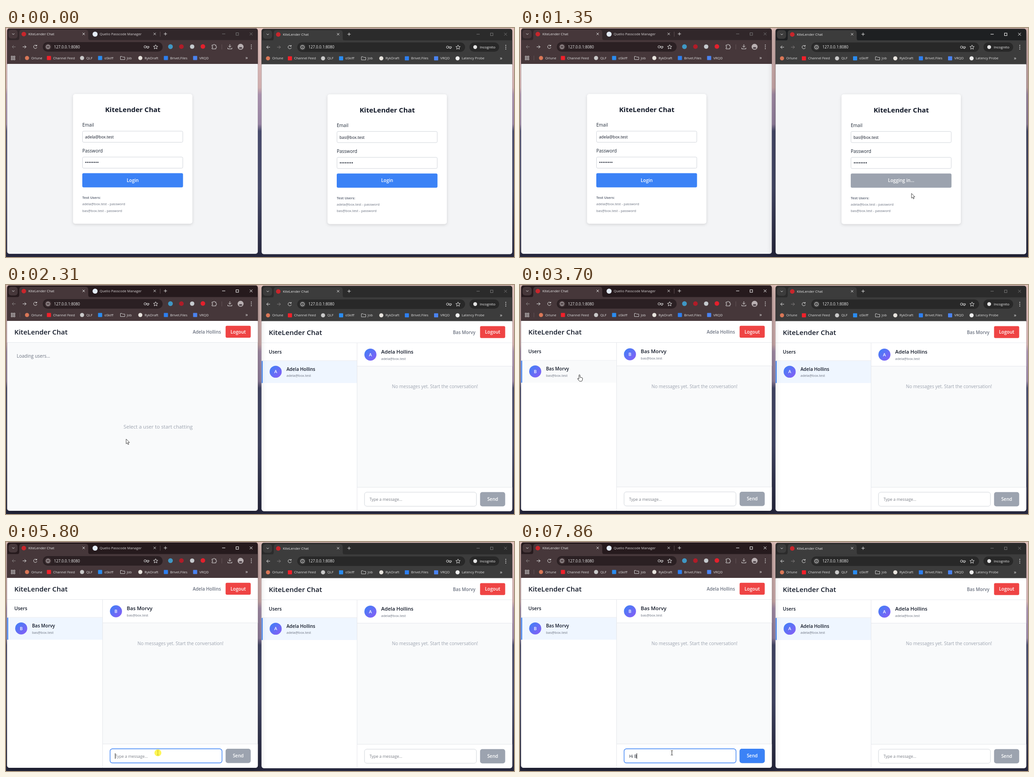
An HTML page for the animation above (8000 ms loop, 1112 px wide and 504 px high).

```html
<!DOCTYPE html>
<html lang="en">
<head>
<meta charset="utf-8">
<title>Two-window chat</title>
<style>
  html, body { margin: 0; width: 100%; height: 100%; overflow: hidden; background: #25263c; }
  svg { display: block; width: 1112px; height: 504px; font-family: "Open Sans", "Noto Sans", sans-serif; }
  text { white-space: pre; }
  .card { filter: drop-shadow(0 2px 3px rgba(0, 0, 0, .13)); }
  .raised { filter: drop-shadow(0 3px 9px rgba(0, 0, 0, .36)); }
</style>
</head>
<body>
<svg viewBox="0 0 1112 504">
  <defs>
    <linearGradient id="sky" x2="0" y2="1">
      <stop offset="0" stop-color="#e0c0ba"/><stop offset=".26" stop-color="#cfadae"/>
      <stop offset=".29" stop-color="#a890ac"/><stop offset=".42" stop-color="#9683a2"/>
      <stop offset=".45" stop-color="#474a6c"/><stop offset=".7" stop-color="#454969"/>
      <stop offset="1" stop-color="#25263c"/>
    </linearGradient>
    <linearGradient id="face" x2="1" y2="1">
      <stop offset="0" stop-color="#3b82f6"/><stop offset="1" stop-color="#8b5cf6"/>
    </linearGradient>
    <clipPath id="frame"><rect x="2.5" y="1" width="548.7" height="496" rx="5"/></clipPath>
  </defs>
  <rect width="1112" height="504" fill="url(#sky)"/>
  <g id="windows"></g>
  <g id="pointer"></g>
</svg>
<script>
const LOOP = 8000;
const APP = 'KiteLender Chat';
const ADELA = { name: 'Adela Hollins', mail: 'adela@box.test' };
const BAS = { name: 'Bas Morvy', mail: 'bas@box.test' };
const INK = '#111827', GREY = '#6b7280', PALE = '#9ca3af', BLUE = '#3b82f6', LINE = '#e5e7eb';

// Login click, signed in, users listed, chat opened
const LEFT = { me: ADELA, peer: BAS, steps: [2060, 2240, 2390, 3640], dx: 0, dy: 0,
  bar: '#46373a', field: '#2b2023', on: '#261a1d', off: '#31272a' };
const RIGHT = { me: BAS, peer: ADELA, steps: [900, 1440, 1520, 1700], dx: 557, dy: .7, incognito: true,
  bar: '#3c3c3c', field: '#282828', on: '#1e2022', off: '#2b2b2b' };

const CLICKS = [900, 1700, 2040, 3600, 4400, 5800];
const KEYS = [6880, 7110, 7300, 7860];
const CARETS = [0, 6.5, 8.7, 11, 16.6];

// time, x, y, shape from then on
const PATH = [
  [70, 1106, 490, 'arrow'], [740, 840, 338, 'hand'], [950, 840, 338, 'arrow'],
  [1350, 857, 364, 'arrow'], [1650, 680, 196, 'hand'], [1760, 675, 196, 'arrow'],
  [2020, 263, 336, 'hand'], [2240, 263, 339, 'arrow'], [2440, 263, 339, 'arrow'],
  [2880, 660, 486, 'arrow'], [3290, 150, 198, 'hand'], [3600, 130, 198, 'hand'],
  [3780, 130, 198, 'arrow'], [4120, 628, 300, 'arrow'], [4420, 678, 194, 'hand'],
  [4870, 678, 194, 'hand'], [5600, 332.5, 464, 'beam']
];

const rect = (x, y, w, h, fill, r = 0, more = '') =>
  `<rect x="${x}" y="${y}" width="${w}" height="${h}" rx="${r}" fill="${fill}" ${more}/>`;
const dot = (x, y, r, fill) => `<circle cx="${x}" cy="${y}" r="${r}" fill="${fill}"/>`;
const line = (d, color, width = 1, fill = 'none') =>
  `<path d="${d}" stroke="${color}" stroke-width="${width}" fill="${fill}" stroke-linejoin="round"/>`;
const text = (x, y, size, str, fill, weight = 400, anchor = 'start') =>
  `<text x="${x}" y="${y}" font-size="${size}" fill="${fill}" font-weight="${weight}" text-anchor="${anchor}">${str}</text>`;
const field = (x, y, w, h, r, color = '#d1d5db', width = 1) =>
  rect(x, y, w, h, '#fff', r, `stroke="${color}" stroke-width="${width}"`);
const button = (x, y, w, h, fill, label, r = 3) =>
  rect(x, y, w, h, fill, r) + text(x + w / 2, y + h / 2 + 3.6, 10, label, '#fff', 600, 'middle');
const avatar = (x, y, user) =>
  dot(x, y, 13.2, 'url(#face)') + text(x, y + 3.4, 9.5, user.name[0], '#fff', 600, 'middle');

const BOOKMARKS = [
  [46, 'Orlune', '#d97757'], [94, 'Channel Feed', '#f0202a', 1], [166.5, 'QLF', '#c9c9c9'],
  [206, 'oSkiff', '#2a8cf0', 1], [255, 'Job'], [294, 'RykDraft', '#e8e4de'],
  [350, 'Brivet.Files', '#2d7ff0', 1], [414, 'VRQD', '#4a83f0', 1], [461, 'Latency Probe', '#eeeeee']
];

function bookmark([x, label, color, square]) {
  const icon = !color ? line(`M${x - 4.5} 62.500h3.500l1.500 1.500h4.500v5.500h-9.500z`, '#ccc')
    : square ? rect(x - 4.5, 61.5, 9, 9, color, 1) : dot(x, 66, 4.5, color);
  return icon + text(x + 9.2, 68.6, 7.5, label, '#dedede');
}

function chrome(win, active) {
  const { incognito } = win;
  const white = '#e3e3e3', dim = '#858080', caption = active ? '#fff' : '#777';
  const end = incognito ? 448 : 343;
  let s = rect(2, 1, 550, 80, active ? win.on : win.off)
    + rect(5.5, 4, 20, 19, win.bar, 6) + line('M13.500 12l2.500 2.500l2.500 -2.500', white)
    + `<path d="M24 27q5 0 5-5v-12q0-6 6-6h139q6 0 6 6v12q0 5 5 5z" fill="${win.bar}"/>`
    + dot(39, 13.5, 5, '#c8262c') + text(49, 16.2, 7.6, APP, '#e8e8e8')
    + line('M167.500 10.500l5 5m0-5l-5 5', white);
  if (!incognito) {
    s += dot(195, 13.5, 5.5, '#e4ecf8') + text(205, 16.2, 7.6, 'Quelio Passcode Manager', '#d8d4d5')
      + line('M323 10.500l5 5m0-5l-5 5', white) + line('M337.500 8v11', '#6a5a5d', .8);
  }
  const plus = incognito ? 194 : 349;
  s += line(`M${plus - 3.500} 13h7m-3.500-3.500v7`, white)
    + line('M473 13h7', caption) + rect(503.5, 10.5, 5.5, 5.5, 'none', 0, `stroke="${caption}"`)
    + line('M533.500 10l6 6m0-6l-6 6', caption)
    + rect(2, 26.5, 550, 54, win.bar)
    + line('M21 41.500h-7.500m3.500-3.500l-3.500 3.500l3.500 3.500', incognito ? white : dim)
    + line('M36.500 41.500h7.500m-3.500-3.500l3.500 3.500l-3.500 3.500', incognito ? dim : white)
    + line('M67 39a3.700 3.700 0 1 0 .700 3.500m-.300-5.500v2.500h-2.800', white)
    + rect(80.5, 31, end - 80.5, 21, win.field, 10.5)
    + dot(92, 41.5, 7, win.bar)
    + line('M88 41.500a4 4 0 1 0 8 0a4 4 0 1 0-8 0M92 41v2.600m0-4.600v1', white)
    + text(105, 44.7, 8.4, '127.0.0.1:8080', '#eeeeee');
  const key = end - 36, star = end - 15.5;
  s += line(`M${key - 5} 41.500a2.500 2.500 0 1 0 5 0a2.500 2.500 0 1 0-5 0m5-1h6v2.500h-1.500v1.500h-2v-1.500h-2.500`, white)
    + line(`M${star} 36.800l1.400 3.200l3.400.300l-2.600 2.300l.800 3.400l-3-1.800l-3 1.800l.800-3.400l-2.600-2.300l3.400-.300z`, white);
  if (incognito) {
    s += rect(457.5, 31, 65, 20.5, win.field, 10) + dot(470, 41.3, 4.2, '#e3e3e3')
      + text(480, 44.2, 7.9, 'Incognito', '#eeeeee');
  } else {
    s += dot(360, 41, 5.2, '#3f97c4') + dot(384, 41, 5, '#b01c28') + dot(407.5, 41, 4.8, '#c5cace')
      + dot(431, 40.8, 5, '#e3202c')
      + line('M451 37.500h3a1.500 1.500 0 0 1 3 0h2.500v3a1.500 1.500 0 0 1 0 3v2.500h-8.500v-2.500a1.500 1.500 0 0 0 0-3z', white)
      + line('M472.500 36v11', '#6a5a5d', .8)
      + line('M490 36v6.500m-3-3l3 3l3-3m-7.500 4v2.500h9v-2.500', white)
      + dot(513.5, 41.3, 6.5, '#b9b0b2') + rect(510, 42, 7, 4, '#55494f', 2);
  }
  for (const y of [37.5, 41.5, 45.5]) s += dot(537, y, 1, white);
  if (!incognito) {
    for (const x of [11.5, 16.5]) for (const y of [62, 67])
      s += rect(x, y, 3, 3, 'none', 0, `stroke="${white}" stroke-width=".9"`);
    s += line('M30.500 61v10', '#6a5a5d', .8);
  }
  s += `<g transform="translate(${incognito ? -29.5 : 0})">`
    + BOOKMARKS.slice(0, incognito ? 9 : 8).map(bookmark).join('') + '</g>';
  return s + text(524, 69, 11, '»', white);
}

function loginPage(win, busy, hover) {
  const fill = busy ? PALE : hover ? '#2563eb' : BLUE;
  return rect(2, 79, 550, 419, '#f3f4f6')
    + rect(146.8, 145.2, 261.2, 285.6, '#fff', 5, 'class="card"')
    + text(277.5, 185, 15, APP, INK, 700, 'middle')
    + text(167, 217, 10, 'Email', '#1f2937', 500) + field(167.5, 227, 219.5, 24.5, 2.5)
    + text(173, 243, 8.75, win.me.mail, INK)
    + text(167, 274, 10, 'Password', '#1f2937', 500) + field(167.5, 284, 219.5, 24.5, 2.5)
    + text(173, 300, 10, '••••••••', INK)
    + button(167, 319.5, 220.5, 31.3, fill, busy ? 'Logging in...' : 'Login')
    + text(167, 376, 7.5, 'Test Users:', GREY, 700)
    + text(167, 390, 7.5, ADELA.mail + ' - password', GREY)
    + text(167, 404.5, 7.5, BAS.mail + ' - password', GREY);
}

function composer(win, t) {
  const focused = win === LEFT && t >= 5800;
  const typed = focused ? KEYS.filter(k => t >= k).length : 0;
  const ready = focused ? Math.min(1, Math.max(0, (t - KEYS[0]) / 200)) : 0;
  let s = rect(212, 445, 340, 53, '#fff') + rect(212, 444, 340, 1, LINE)
    + (focused ? field(227.8, 455.3, 245, 31, 5, BLUE, 1.4) : field(227.8, 455.3, 245, 31, 5))
    + (typed ? text(239, 474.5, 8.75, 'Hi B'.slice(0, typed), INK)
      : text(238.7, 474.5, 8.75, 'Type a message...', '#7b7f87'))
    + rect(480.7, 455, 55, 31.5, PALE, 5)
    + `<g opacity="${ready.toFixed(2)}">${rect(480.7, 455, 55, 31.5, BLUE, 5)}</g>`
    + text(508.3, 474.3, 10, 'Send', '#fff', 600, 'middle');
  if (focused && (t < 6340 || typed)) s += rect(238.6 + CARETS[typed], 465, 1, 12, '#111');
  return s;
}

function chatPage(win, step, t, hover) {
  const { me, peer } = win;
  let s = rect(2, 79, 550, 419, '#f9fafb') + rect(2, 79, 550, 47, '#fff') + rect(2, 126, 550, 1, LINE)
    + text(18.3, 109, 15, APP, INK, 600) + text(470.5, 107, 9.8, me.name, GREY, 600, 'end')
    + button(480.7, 89.8, 55, 26.2, '#ef4444', 'Logout');
  if (step === 2) {
    return s + text(23.5, 160, 10, 'Loading users...', GREY)
      + text(333, 316, 11.2, 'Select a user to start chatting', PALE, 400, 'middle');
  }
  const open = step === 4;
  const settled = open && t > win.steps[3] + 150;
  s += rect(2, 127, 209, 371, '#fff') + rect(211, 127, 1, 371, LINE)
    + text(18.3, 150, 10.4, 'Users', INK, 600) + rect(2, 165.5, 209, 1, LINE)
    + rect(2, 166.5, 209, 48.5, settled ? '#eff6ff' : open || hover ? '#f9fafb' : '#fff')
    + (open ? rect(2, 166.5, 2.8, 48.5, BLUE) : '')
    + avatar(33.3, 190.2, peer) + text(57, 188.3, 10, peer.name, INK, 600)
    + text(57, 201.6, 7.5, peer.mail, GREY);
  if (!open) return s + text(381, 316, 11.2, 'Select a user to start chatting', PALE, 400, 'middle');
  return s + rect(212, 127, 340, 51, '#fff') + rect(212, 177.5, 340, 1, LINE)
    + avatar(240.7, 152.5, peer) + text(264.3, 150.3, 11.2, peer.name, INK, 600)
    + text(264.3, 164.3, 7.5, peer.mail, GREY)
    + text(382, 226.8, 9.95, 'No messages yet. Start the conversation!', PALE, 400, 'middle')
    + composer(win, t);
}

function drawWindow(win, active, t, mouse) {
  const step = win.steps.filter(s => t >= s).length;
  const inside = (x, y, w, h) => mouse && mouse.x - win.dx > x && mouse.x - win.dx < x + w
    && mouse.y > y && mouse.y < y + h;
  const page = step < 2 ? loginPage(win, step === 1, inside(167, 320, 220, 31))
    : chatPage(win, step, t, inside(2, 166, 209, 49));
  return `<g transform="translate(${win.dx} ${win.dy})">`
    + rect(2.5, 1, 548.7, 496, win.bar, 5, active ? 'class="raised"' : '')
    + `<g clip-path="url(#frame)">${chrome(win, active)}${page}</g></g>`;
}

function mouseAt(t) {
  if (t < PATH[0][0]) return null;
  const i = PATH.findLastIndex(p => t >= p[0]);
  const [t0, x, y, shape] = PATH[i];
  const [t1, x1, y1] = PATH[i + 1] || [LOOP, x, y];
  const u = (t - t0) / (t1 - t0), k = u * u * (3 - 2 * u);
  return { x: x + (x1 - x) * k, y: y + (y1 - y) * k, shape };
}

const SHAPES = {
  arrow: line('M0 0v10.500l2.400-2.200l1.700 3.900l1.700-.800l-1.700-3.700h3.300z', '#333', .9, '#fff'),
  hand: line('M-1 1q0-1.500 1.200-1.500t1.200 1.500v4l3.600.700q2 .400 2 2.300l-.800 4q-.400 2-2.500 2h-2.200q-1.300 0-2.200-1.200l-3.500-4.600q.800-1.500 3.200.700z', '#222', .9, '#fff'),
  beam: line('M-2.300-5h1.500q.800 0 .800 1v8q0 1 .800 1h1.500m-4.600 0h1.500q.800 0 .800-1v-8q0-1 .800-1h1.500', '#222', .9)
};

function drawPointer(mouse, t) {
  if (!mouse) return '';
  const clicked = CLICKS.some(c => t >= c && t < c + 70);
  return `<g transform="translate(${mouse.x.toFixed(2)} ${mouse.y.toFixed(2)})">`
    + SHAPES[mouse.shape] + (clicked ? dot(0, 0, 7.6, 'rgba(255, 242, 20, .72)') : '') + '</g>';
}

const shown = {};
function show(id, html) {
  if (shown[id] !== html) document.getElementById(id).innerHTML = shown[id] = html;
}

function activeWindow(t) {
  if (t < 900) return null;
  if (t < 2040) return RIGHT;
  return t >= 4400 && t < 5800 ? RIGHT : LEFT;
}

const start = performance.now();
function frame() {
  const t = (performance.now() - start) % LOOP;
  const mouse = mouseAt(t), active = activeWindow(t);
  const order = active === LEFT ? [RIGHT, LEFT] : [LEFT, RIGHT];
  show('windows', order.map(win => drawWindow(win, win === active, t, mouse)).join(''));
  show('pointer', drawPointer(mouse, t));
  requestAnimationFrame(frame);
}
frame();
</script>
</body>
</html>
```
